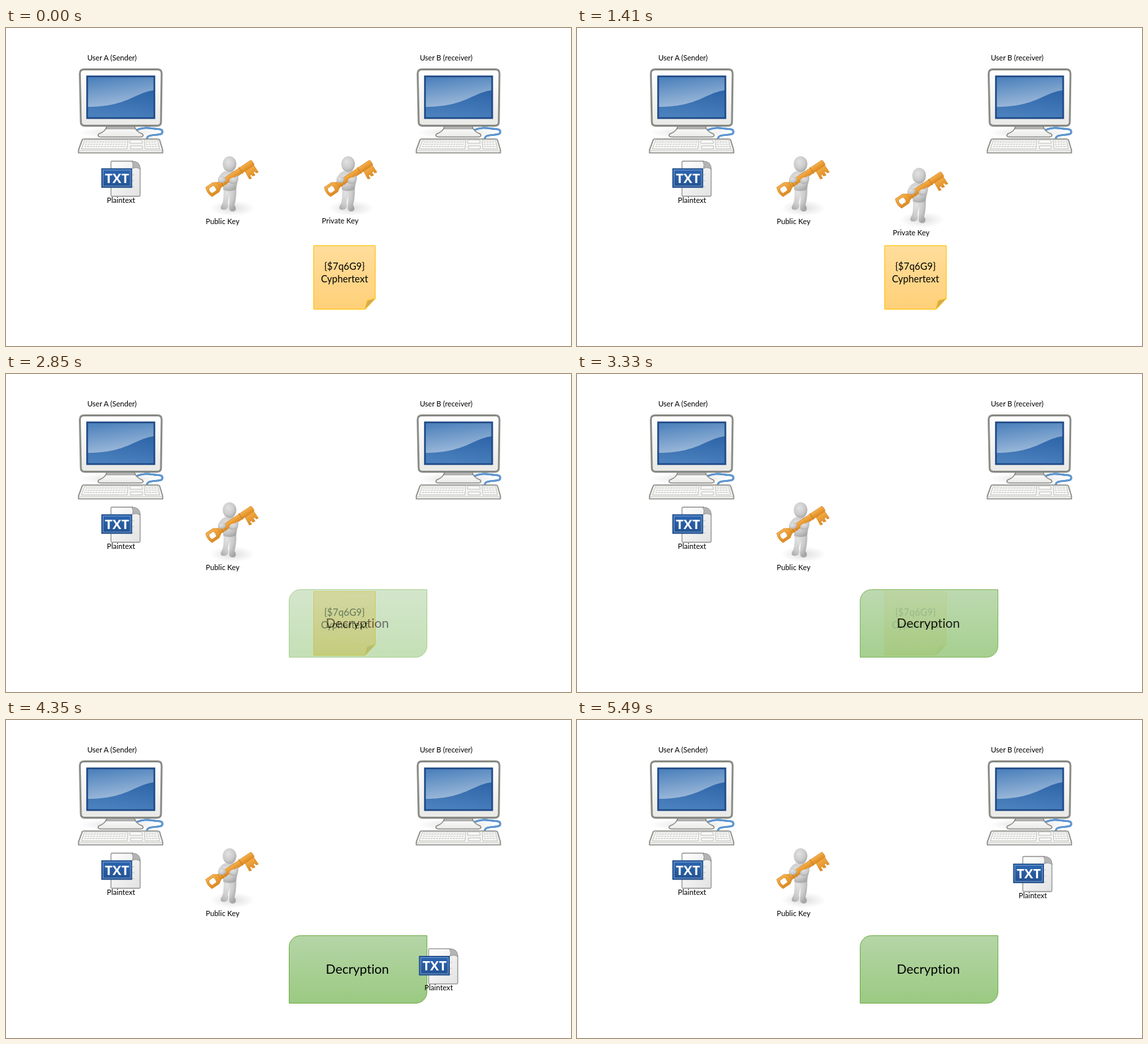
An HTML page that plays this animation: 853 by 480 pixels, repeating every 5.55 s.

```html
<!DOCTYPE html>
<html lang="en">
<head>
<meta charset="utf-8">
<title>Decryption with a private key</title>
<style>
  html, body { margin: 0; width: 100%; height: 100%; overflow: hidden; background: #fff; }
  svg { display: block; width: 100vw; height: 100vh; }
  text { font: 11.1px Lato, sans-serif; font-variant-ligatures: none; text-anchor: middle; }
  .note { font-size: 14.5px; }
  .title { font-size: 19.4px; }
  .badge { font: 700 20px "Open Sans", sans-serif; fill: #fff; }
</style>
</head>
<body>
<svg viewBox="0 0 853 480">
  <defs>
    <linearGradient id="screen" x1=".4" x2=".6" y2="1">
      <stop stop-color="#4f83bd"/><stop offset=".65" stop-color="#98b6d8"/>
    </linearGradient>
    <linearGradient id="wave" x1=".8" x2=".5" y2="1">
      <stop stop-color="#2f66a9"/><stop offset="1" stop-color="#4a80bd"/>
    </linearGradient>
    <linearGradient id="case" x2="0" y2="1">
      <stop stop-color="#fff"/><stop offset="1" stop-color="#e9e9e6"/>
    </linearGradient>
    <linearGradient id="paper" x2="1" y2="1">
      <stop stop-color="#fff"/><stop offset="1" stop-color="#e2e2e2"/>
    </linearGradient>
    <linearGradient id="blue" x2="0" y2="1">
      <stop stop-color="#2c66b2"/><stop offset="1" stop-color="#235291"/>
    </linearGradient>
    <linearGradient id="gold" x2="0" y2="1">
      <stop stop-color="#f6b04a"/><stop offset="1" stop-color="#de8a22"/>
    </linearGradient>
    <linearGradient id="sticky" x2="0" y2="1">
      <stop stop-color="#ffdd9c"/><stop offset="1" stop-color="#ffd078"/>
    </linearGradient>
    <linearGradient id="green" x2="0" y2="1">
      <stop stop-color="#b5d5a7"/><stop offset="1" stop-color="#9bca82"/>
    </linearGradient>
    <radialGradient id="skin" cx=".4" cy=".35" r=".7">
      <stop stop-color="#e2e2e2"/><stop offset=".6" stop-color="#cbcbcb"/><stop offset="1" stop-color="#a6a6a6"/>
    </radialGradient>
    <radialGradient id="shade">
      <stop stop-color="#000" stop-opacity=".13"/><stop offset="1" stop-color="#000" stop-opacity="0"/>
    </radialGradient>

    <g id="computer">
      <ellipse cx="172" cy="158" rx="62" ry="9" fill="url(#shade)"/>
      <g fill="none">
        <path id="cable" d="M197 154C208 149 216 151 224 152S237 152 236 158S211 158 213 168" stroke="#5f96cf" stroke-width="2.800"/>
        <use href="#cable" stroke="#a9c9ea"/>
      </g>
      <path d="M152 148H194Q195 156 206 160Q209 164 203 164.500H143Q137 164 140 160Q151 156 152 148Z" fill="url(#case)" stroke="#888a85" stroke-width="1.600"/>
      <path d="M152 149H194L196 153H150Z" fill="#777" opacity=".55"/>
      <path d="M118 62.500H229Q235 62.500 235 69L234 142Q234 147.500 228 147.500H119Q113 147.500 113 142L111.500 69Q111.500 62.500 118 62.500Z" fill="url(#case)" stroke="#888a85" stroke-width="2.800"/>
      <rect x="122.500" y="73" width="101.500" height="63" fill="url(#screen)"/>
      <path d="M224 94C194 97 184 119 123 119V136H224Z" fill="url(#wave)"/>
      <rect x="122.500" y="73" width="101.500" height="63" fill="none" stroke="#204a87" stroke-width="2.600"/>
      <path d="M117 167.500H229Q231 167.500 232 169L236.500 184V188.500H109.500V184L115 169Q116 167.500 117 167.500Z" fill="#f4f4f2" stroke="#888a85" stroke-width="1.700"/>
      <path d="M110 185H236" stroke="#c4c5c1"/>
      <path d="M119 169H184L183 182.500H114ZM187 169H205L206 174H187ZM188 178H206V182.500H188ZM209 169H229L232 182.500H210Z" fill="#fafaf9" stroke="#b9bab6" stroke-width=".9"/>
      <path d="M120 172H182M119 175.500H182M118 179H182M211 172H228M211 175.500H229M212 179H230" fill="none" stroke="#d8d8d5" stroke-width="2" stroke-dasharray="3.200 1"/>
    </g>

    <g id="file">
      <path d="M160 201H191L202.500 212V252.500Q202.500 254 201 254H160Q158.500 254 158.500 252.500V202.500Q158.500 201 160 201Z" fill="url(#paper)" stroke="#929292" stroke-width="1.300"/>
      <path d="M190 201Q193 206 191 212Q197 209 202.500 213Q203 201 190 201Z" fill="#b4b4b4" stroke="#888" stroke-width=".8"/>
      <path d="M188 221.500H194M188 230.500H194M188 239.500H194" stroke="#d2d2d2" stroke-width="1.500"/>
      <rect x="144.700" y="212.500" width="45" height="28" fill="url(#blue)" stroke="#1f4b87" stroke-width="1.500"/>
      <rect x="146.500" y="214.300" width="41.400" height="24.400" fill="none" stroke="#7fa3d2" stroke-width=".9"/>
      <text class="badge" x="167.500" y="234">TXT</text>
      <text x="173.700" y="264">Plaintext</text>
    </g>

    <g id="holder">
      <ellipse cx="342" cy="272" rx="34" ry="12" fill="url(#shade)"/>
      <g fill="url(#skin)">
        <path d="M328 234H347Q349 253 345 267Q350 275 343 277Q336 277 337 270L337.500 252L335 264Q337 273 330 274.500Q322 275 325 268Q330 262 328 234Z"/>
        <path d="M331 216Q337 219 344 216Q351 219 350 230L347 244Q337 248 328 244L327 232Q319 235 320 228Q324 218 331 216Z"/>
        <ellipse cx="337.500" cy="205.500" rx="10.300" ry="12"/>
      </g>
      <g transform="translate(313 243) rotate(-34)" fill="url(#gold)" stroke="#cf8423" stroke-width=".7">
        <path d="M55 2H70.500V17L67 16V13H64V18L60 17V14H57V19L53.500 18Z"/>
        <rect x="8" y="-4.500" width="64" height="9" rx="2"/>
        <path fill-rule="evenodd" d="M-8 -8.500H5L11 -4.500V4.500L5 8.500H-8Q-12 0 -8 -8.500ZM-5 -4.500Q-8 0 -5 4.500H3Q5 0 3 -4.500Z"/>
        <path d="M15 -5.500V5.500M20 -5.500V5.500M50 -5.500V5.500" stroke-width="1.300"/>
      </g>
      <g fill="url(#skin)">
        <ellipse cx="326" cy="229" rx="6" ry="5"/>
        <path d="M350 222Q353 233 344 235Q336 236 337 230Q338 226 346 225Z"/>
      </g>
    </g>
  </defs>

  <rect width="853" height="480" fill="#fff"/>
  <use href="#computer"/>
  <use href="#computer" x="510"/>
  <text x="160" y="49">User A (Sender)</text>
  <text x="664.500" y="49">User B (receiver)</text>
  <use href="#file"/>
  <use href="#holder"/>
  <text x="327" y="296">Public Key</text>

  <g id="privateKey">
    <use href="#holder" x="179"/>
    <text x="504.500" y="295">Private Key</text>
  </g>

  <g>
    <path d="M464.500 328.500H557.500V408.500L542 424.500H464.500Z" fill="url(#sticky)" stroke="#ffc000"/>
    <path d="M542 424.500L545.500 411.500L557.500 408.500Z" fill="#d0aa5c" stroke="#ffc000"/>
    <text class="note" x="511" y="364.500">{$7q6G9}</text>
    <text class="note" x="511" y="383.500">Cyphertext</text>
  </g>

  <g id="panel">
    <path d="M444.500 325.500H635.500V410.500A17 17 0 0 1 618.500 427.500H427.500V342.500A17 17 0 0 1 444.500 325.500Z" fill="url(#green)" stroke="#70ad47"/>
    <text class="title" x="530.500" y="383">Decryption</text>
  </g>

  <use id="decrypted" href="#file"/>
</svg>
<script>
  const LOOP = 5550, HOLD = 930, STEP = 60;
  const [privateKey, panel, decrypted] =
    ["privateKey", "panel", "decrypted"].map(id => document.getElementById(id));

  const progress = (t, from, to) => Math.min(1, Math.max(0, (t - from) / (to - from)));
  // Constant acceleration, then constant deceleration
  const ease = u => u < 0.5 ? 2 * u * u : 1 - 2 * (1 - u) ** 2;
  const move = (el, x, y) => el.setAttribute("transform", `translate(${x} ${y})`);

  function draw(now) {
    const time = now % LOOP;
    const t = time < HOLD ? 0 : HOLD + Math.floor((time - HOLD) / STEP) * STEP;

    // The private key disappears once it reaches the note
    const drop = progress(t, 960, 2700);
    move(privateKey, 0, 131 * ease(drop));
    privateKey.setAttribute("opacity", drop < 1 ? 1 : 0);
    panel.setAttribute("opacity", progress(t, 1930, 3510));

    const rise = ease(progress(t, 4320, 5460));
    decrypted.setAttribute("opacity", progress(t, 3510, 4140));
    move(decrypted, 479.5 + 35 * rise, 144.5 - 139.5 * rise);
    requestAnimationFrame(draw);
  }
  requestAnimationFrame(draw);
</script>
</body>
</html>
```
